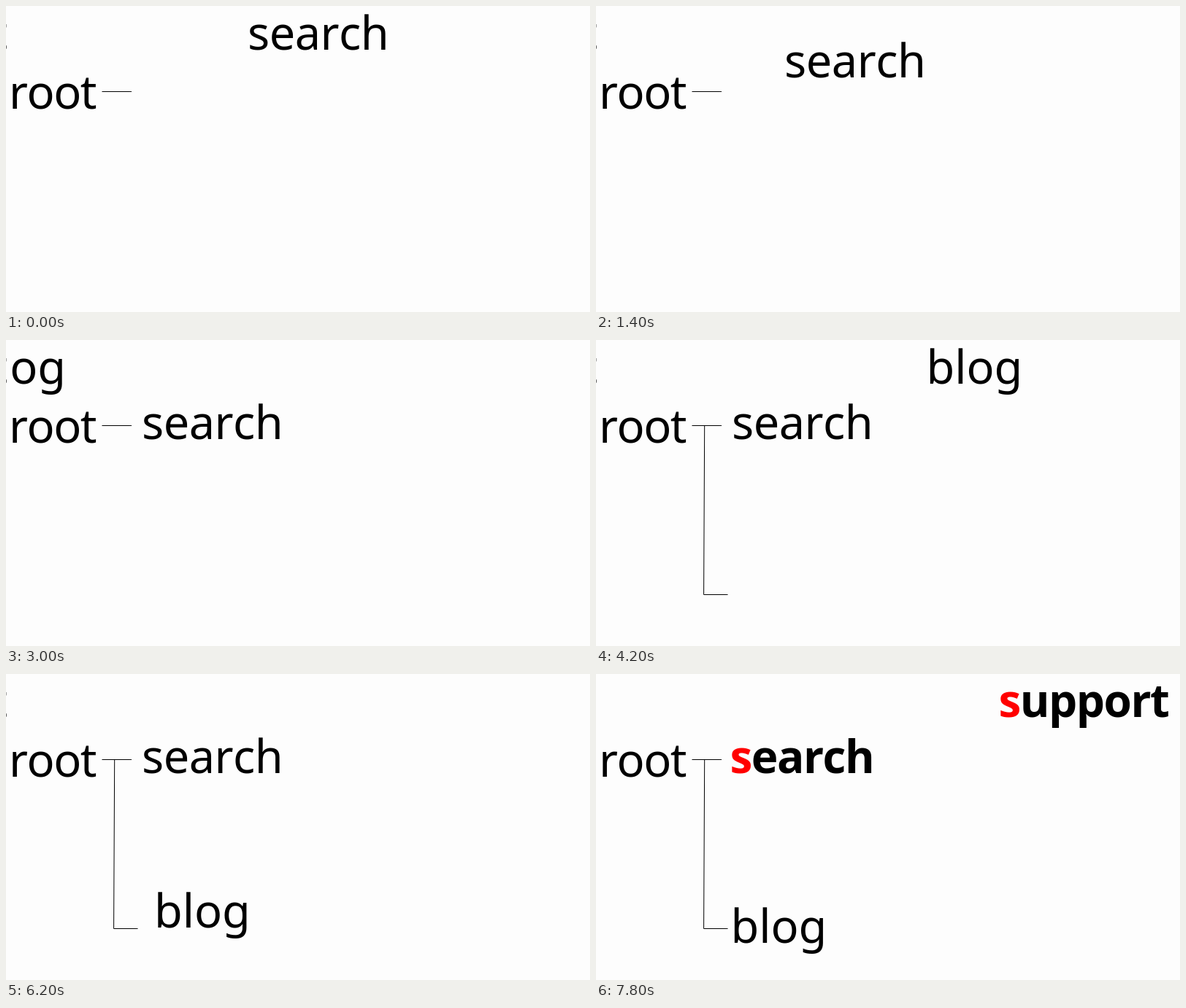
An HTML page for the animation above (8 s loop, 800 px wide and 420 px high).

```html
<!DOCTYPE html>
<html lang="en">
<head>
<meta charset="utf-8">
<title>Building a word tree</title>
<style>
  html, body { margin: 0; width: 100%; height: 100%; overflow: hidden; background: #fdfdfd; }
  svg { display: block; width: 800px; height: 420px; }
  text { font: 63px "Noto Sans", "Open Sans", sans-serif; font-kerning: none; letter-spacing: -0.5px; }
  .bold { font-size: 62px; font-weight: 700; letter-spacing: -1.5px; }
  .bold tspan { fill: #f00; }
  #root, #support { letter-spacing: -1.5px; }
  #blog { letter-spacing: 0; }
  path { fill: none; stroke: #000; stroke-width: 1; }
</style>
</head>
<body>
<svg viewBox="0 0 800 420">
  <text id="root" x="4" y="141">root</text>
  <path d="M131.5 117.5H172"/>
  <path id="branch" d="M148.7 117.5L147.6 349.5H180.5"/>
  <text id="search">search</text>
  <text id="blog">blog</text>
  <text id="support">support</text>
  <g id="match">
    <text class="bold" x="183.5" y="135.5"><tspan>s</tspan>earch</text>
    <text class="bold" x="551.5" y="59"><tspan>s</tspan>upport</text>
  </g>
</svg>
<script>
  const LOOP = 8000, STEP = 200;
  const BRANCH_AT = 4000, MATCH_AT = 7800;

  // Each move: start time, duration, from [x, y], to [x, y].
  const moves = {
    search: [[296, 2200, [331, 60], [186, 136.3]]],
    blog: [
      [2815, 760, [-131, 60], [452.5, 60]],
      [4372, 2200, [452.5, 60], [184.5, 369]]
    ],
    support: [[6851, 730, [-222.5, 59], [556, 59]]]
  };

  const byId = id => document.getElementById(id);
  const show = (id, on) => byId(id).setAttribute("visibility", on ? "visible" : "hidden");
  const ease = p => (1 - Math.cos(Math.PI * Math.min(1, Math.max(0, p)))) / 2;

  function place(id, time) {
    const list = moves[id];
    const [start, duration, from, to] = list.filter(m => m[0] <= time).pop() || list[0];
    const p = ease((time - start) / duration);
    const [x, y] = from.map((v, i) => v + (to[i] - v) * p);
    byId(id).setAttribute("x", x);
    byId(id).setAttribute("y", y);
  }

  function draw(now) {
    const time = Math.floor((now % LOOP) / STEP) * STEP;
    Object.keys(moves).forEach(id => place(id, time));
    show("branch", time >= BRANCH_AT);
    const matched = time >= MATCH_AT;
    show("match", matched);
    show("search", !matched);
    show("support", !matched);
  }

  let origin;
  function tick(now) {
    origin ??= now;
    draw(now - origin);
    requestAnimationFrame(tick);
  }
  draw(0);
  requestAnimationFrame(tick);
</script>
</body>
</html>
```
